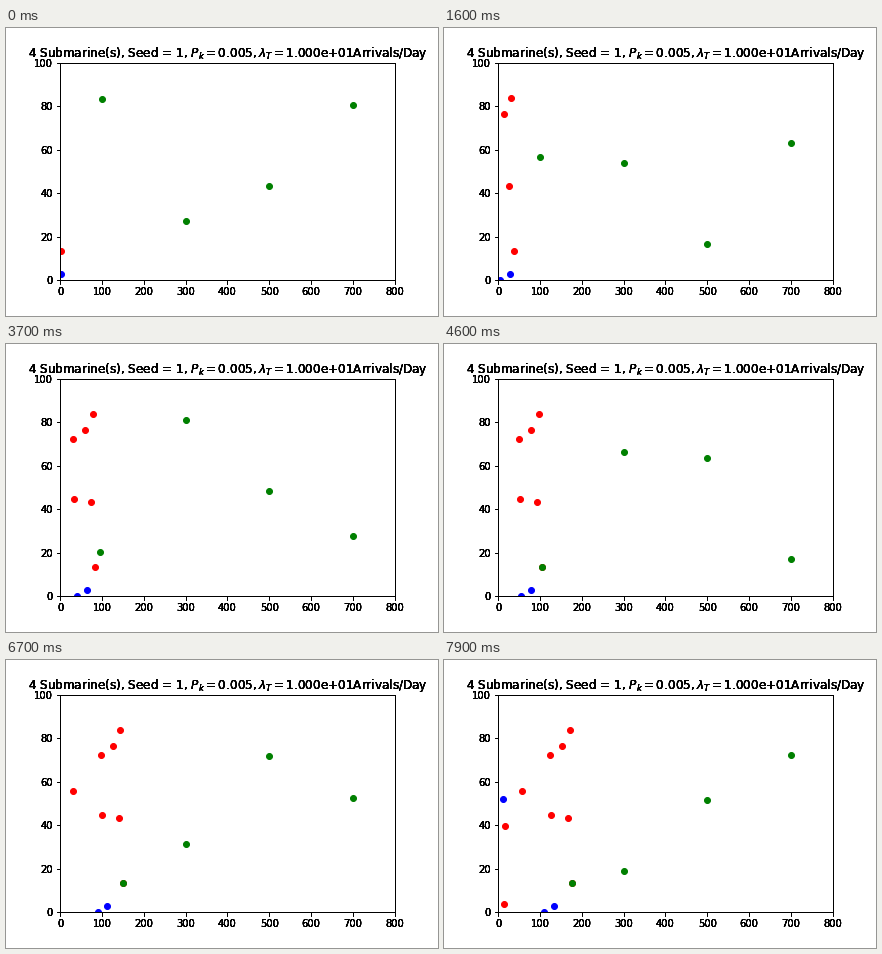
A matplotlib script that plays this animation: 432 px wide and 288 px high, repeating every 8 s.

```python
import numpy as np
import matplotlib.pyplot as plt
from matplotlib.animation import FuncAnimation

FRAMES, INTERVAL = 80, 100
V_RED, V_BLUE, V_SUB, V_CHASE = 20 / 9, 15 / 9, 15 / 9, 5.0
LOW, HIGH = 15, 85
LAYERS = 6  # stacked axes thicken the antialiased text

# (frame just before the first step, height)
REDS = [(-1, 13.44), (2, 83.58), (4, 43.28), (10, 76.23), (22, 44.54),
        (23, 72.15), (53, 55.65), (71, 39.4), (72.5, 3.9)]
BLUES = [(-1, 2.83), (13, 0.21), (72, 51.9)]
# (x, start height, direction)
SUBS = [(100, 84.74, -1), (300, 25.51, 1), (500, 44.95, -1), (700, 78.87, 1)]
CHASE_FROM = 37  # frame in which the first submarine leaves its patrol

TITLE = (r"4 Submarine(s), Seed = 1, $P_k = 0.005, \lambda_T = $"
         "1.000e+01Arrivals/Day")

plt.rcParams.update({"font.family": "DejaVu Sans", "font.size": 10})
fig = plt.figure(figsize=(6, 4), dpi=72, facecolor="white")


def make_axes(layer):
    ax = fig.add_axes([0.125, 0.125, 0.775, 0.755], label=str(layer))
    ax.patch.set_visible(False)
    ax.set(xlim=(0, 800), ylim=(0, 100))
    ax.set_title(TITLE, fontsize=12)
    return ax


axes = [make_axes(i) for i in range(LAYERS)]
red, blue, green = (axes[0].plot([], [], c + "o")[0] for c in "rbg")


def ships(fleet, speed, n):
    return [(speed * (n - t), y) for t, y in fleet if n > t]


def patrol(y, direction, n):
    """Bounce between LOW and HIGH."""
    span = HIGH - LOW
    d = (y + direction * V_SUB * (n + 1) - LOW) % (2 * span)
    return LOW + min(d, 2 * span - d)


def hunter(n):
    """Patrol, then run down the first red ship and stay on it."""
    x, y, direction = SUBS[0]
    pos = np.array([x, patrol(y, direction, min(n, CHASE_FROM - 1))])
    for k in range(CHASE_FROM, n + 1):
        gap = np.array(ships(REDS[:1], V_RED, k)[0]) - pos
        dist = np.hypot(*gap)
        pos = pos + gap * min(1, V_CHASE / max(dist, 1e-9))
    return tuple(pos)


def update(n):
    subs = [hunter(n)] + [(x, patrol(y, d, n)) for x, y, d in SUBS[1:]]
    groups = ships(REDS, V_RED, n), ships(BLUES, V_BLUE, n), subs
    for dots, points in zip((red, blue, green), groups):
        dots.set_data(*zip(*points))
    return red, blue, green


anim = FuncAnimation(fig, update, frames=FRAMES, interval=INTERVAL,
                     repeat=True, repeat_delay=0, blit=False)
plt.show()
```
